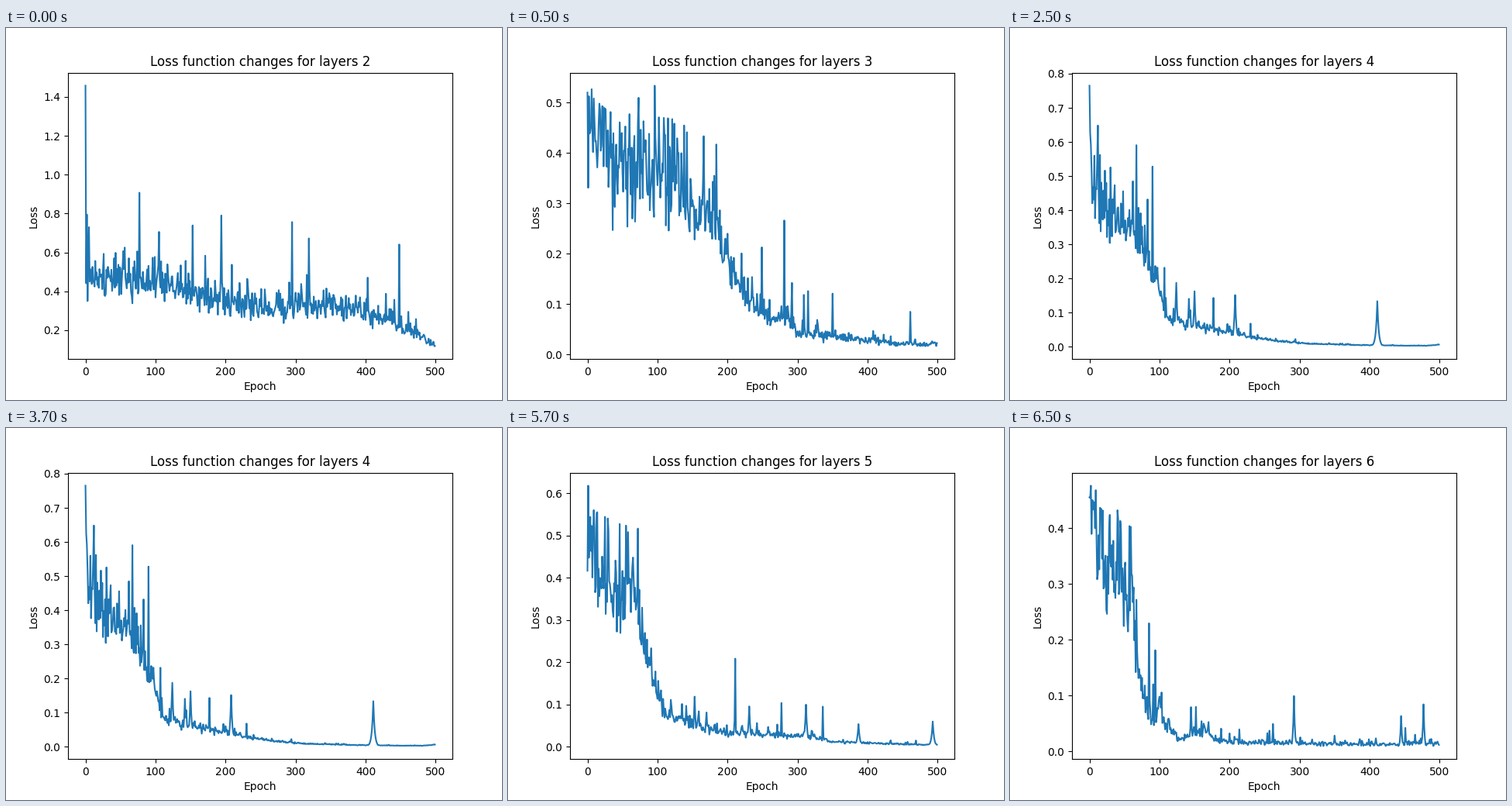
A matplotlib script that plays this animation: 640 px wide and 480 px high, repeating every 8000 ms.

```python
import numpy as np
import matplotlib.pyplot as plt
from matplotlib.animation import FuncAnimation

EPOCHS = np.arange(500)


def loss_curve(layers, lowest, trend, peaks, noise, width):
    """A falling trend with relative noise, random spikes and a few main peaks."""
    rng = np.random.default_rng(layers)
    size = EPOCHS.size
    highest = max(peaks.values())
    base = np.interp(EPOCHS, list(trend), np.log(list(trend.values())))
    jitter = noise * rng.normal(size=size)
    spikes = (rng.random(size) < 0.12) * rng.exponential(2.5 * noise, size)
    headroom = 0.7 * (np.log(highest) - base)
    loss = np.exp(base + np.minimum(jitter + spikes, headroom))
    for epoch, height in peaks.items():
        peak = height * np.exp(-np.abs(EPOCHS - epoch) / width)
        loss = np.maximum(loss, peak)
    return layers, np.clip(loss, lowest, highest), lowest, highest


CURVES = [
    loss_curve(
        2, 0.1183,
        trend={0: .47, 120: .44, 170: .37, 230: .33, 370: .32, 440: .26,
               499: .13},
        peaks={0: 1.458, 2: .795, 5: .73, 54: .607, 99: .577, 143: .557,
               316: .485},
        noise=0.12, width=0.6),
    loss_curve(
        3, 0.0168,
        trend={0: .49, 30: .38, 120: .345, 185: .24, 225: .125, 265: .062,
               285: .08, 300: .045, 450: .021, 499: .02},
        peaks={6: .527, 73: .51, 96: .534, 138: .455, 249: .213, 350: .121,
               461: .085},
        noise=0.15, width=0.8),
    loss_curve(
        4, 0.0014,
        trend={0: .49, 20: .41, 75: .31, 97: .19, 112: .08, 200: .042,
               320: .008, 450: .0028, 480: .0024, 499: .006},
        peaks={0: .765, 11: .547, 124: .187, 142: .14, 150: .162, 208: .151,
               411: .133},
        noise=0.12, width=2),
    loss_curve(
        5, 0.002,
        trend={0: .47, 40: .37, 72: .34, 90: .20, 110: .08, 200: .032,
               320: .025, 350: .013, 480: .005, 499: .006},
        peaks={1: .618, 10: .517, 65: .448, 153: .119, 231: .096, 312: .10,
               387: .054, 493: .06},
        noise=0.15, width=2),
    loss_curve(
        6, 0.0092,
        trend={0: .41, 20: .34, 60: .27, 75: .12, 90: .05, 100: .09,
               130: .02, 165: .04, 182: .017, 430: .012, 499: .015},
        peaks={2: .476, 9: .468, 40: .432, 145: .079, 292: .099, 445: .063,
               477: .084},
        noise=0.17, width=1.5),
]

fig, ax = plt.subplots(figsize=(6.4, 4.8), dpi=100)


def draw(step):
    # The first curve stays for one step, the others for up to four.
    layers, loss, lowest, highest = CURVES[(step + 3) // 4]
    margin = 0.05 * (highest - lowest)
    ax.clear()
    ax.plot(EPOCHS, loss)
    ax.set_ylim(lowest - margin, highest + margin)
    ax.set_title(f"Loss function changes for layers {layers}")
    ax.set_xlabel("Epoch")
    ax.set_ylabel("Loss")


animation = FuncAnimation(fig, draw, frames=16, interval=500,
                          init_func=lambda: draw(0), repeat=True,
                          repeat_delay=0)
plt.show()
```
